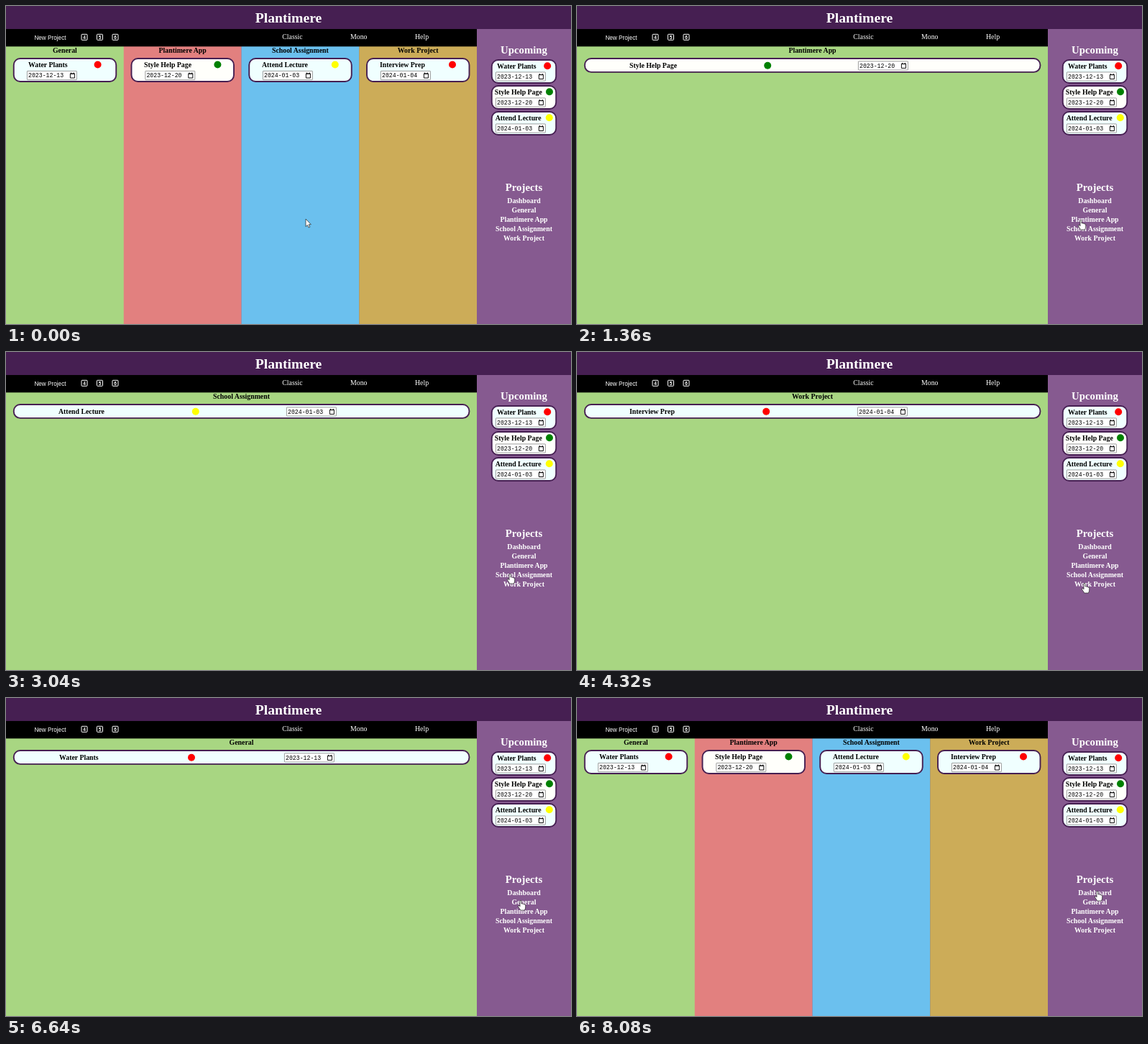
Recreate the animation shown at these times as an HTML page. Size 786 px wide and 442 px high, loop 8.32 s.

```html
<!DOCTYPE html>
<html lang="en">
<head>
<meta charset="utf-8">
<title>Task board</title>
<style>
  html, body { margin: 0; width: 100%; height: 100%; overflow: hidden; background: #461f52; }
  svg { display: block; width: 786px; height: 442px; }
  text { font: 9.84px "Liberation Serif", "Times New Roman", serif; white-space: pre; }
  .bold { font-weight: bold; }
  .title { font-size: 19.7px; font-weight: bold; }
  .head { font-size: 14.77px; font-weight: bold; }
  .button { font: 8.2px "Liberation Sans", Arial, sans-serif; }
  .date { font: 8.2px "Liberation Mono", monospace; }
  .digit { font: bold 6.5px "Liberation Sans", Arial, sans-serif; }
</style>
</head>
<body>
<svg id="stage" viewBox="0 0 786 442" xmlns="http://www.w3.org/2000/svg"></svg>
<script>
const LOOP = 8320;
const PURPLE = '#461f52', GREEN = '#a8d682', AZURE = '#f0ffff', IVORY = '#fffffb';
const stage = document.getElementById('stage');

function add(parent, tag, attrs = {}, content) {
  const node = document.createElementNS('http://www.w3.org/2000/svg', tag);
  for (const key in attrs) node.setAttribute(key, attrs[key]);
  if (content !== undefined) node.textContent = content;
  parent.appendChild(node);
  return node;
}
const group = parent => add(parent, 'g');
const box = (parent, x, y, width, height, fill, more = {}) =>
  add(parent, 'rect', { x, y, width, height, fill, ...more });
const label = (parent, x, y, content, cls = 'bold', fill = '#000', anchor = 'start') =>
  add(parent, 'text', { x, y, class: cls, fill, 'text-anchor': anchor }, content);
const centered = (parent, x, y, content, cls, fill) =>
  label(parent, x, y, content, cls, fill, 'middle');

// wide: name, dot and date positions in the single-project view
const projects = [
  { name: 'General', color: GREEN, task: 'Water Plants', date: '2023-12-13',
    dot: 'red', fill: AZURE, nameX: 31, dotX: 127.6, dateX: 29, wide: [74, 258, 387] },
  { name: 'Plantimere App', color: '#e2807f', task: 'Style Help Page', date: '2023-12-20',
    dot: 'green', fill: IVORY, nameX: 192, dotX: 294.4, dateX: 193.4, wide: [73, 265.2, 391] },
  { name: 'School Assignment', color: '#6bc0ee', task: 'Attend Lecture', date: '2024-01-03',
    dot: 'yellow', fill: AZURE, nameX: 356, dotX: 457.8, dateX: 357, wide: [73, 263.8, 390] },
  { name: 'Work Project', color: '#ccac58', task: 'Interview Prep', date: '2024-01-04',
    dot: 'red', fill: AZURE, nameX: 520, dotX: 621, dateX: 521, wide: [73, 263.2, 390] }
];

function dateField(parent, x, y, date) {
  box(parent, x + .4, y + .4, 69, 12.2, '#fff', { stroke: '#767676', 'stroke-width': .7, rx: .5 });
  label(parent, x + 2, y + 9.4, date, 'date');
  add(parent, 'path', {
    d: `M${x + 60.4} ${y + 4}h6v6h-6zM${x + 60.4} ${y + 4.2}h6M${x + 61.5} ${y + 2.5}v1.5m3.8 0v-1.5`,
    fill: 'none', stroke: '#111', 'stroke-width': 1
  });
}

function card(parent, x, y, w, h, p, nameX, nameY, dotX, dotY, dateX, dateY) {
  box(parent, x + .95, y + .95, w - 1.9, h - 1.9, p.fill,
    { rx: 9, stroke: PURPLE, 'stroke-width': 1.9 });
  label(parent, nameX, nameY, p.task);
  add(parent, 'circle', { cx: dotX, cy: dotY, r: 5, fill: p.dot });
  dateField(parent, dateX, dateY, p.date);
}

function buildDashboard() {
  const g = group(stage);
  projects.forEach((p, i) => {
    const x = i * 163.75;
    box(g, x, 56, 164, 386, p.color);
    centered(g, x + 81.9, 65.2, p.name, 'bold', '#000');
    card(g, x + 9.8, 72, 144.4, 34, p, p.nameX, 85, p.dotX, 81.5, p.dateX, 90);
  });
  return g;
}

function buildProject(p) {
  const g = group(stage);
  const [nameX, dotX, dateX] = p.wide;
  box(g, 0, 56, 655, 386, GREEN);
  centered(g, 327.5, 65.2, p.name, 'bold', '#000');
  card(g, 9.8, 72, 635.6, 20.8, p, nameX, 86, dotX, 82.8, dateX, 76.4);
  return g;
}

const links = ['Dashboard', ...projects.map(p => p.name)]
  .map((name, i) => ({ name, y: 274 + i * 13, half: name.length * 2.4 }));

function buildFrame() {
  box(stage, 0, 0, 786, 32, PURPLE);
  centered(stage, 393, 23, 'Plantimere', 'title', '#fff');
  box(stage, 0, 32, 655, 24.3, '#000');
  label(stage, 39.4, 47, 'New Project', 'button', '#fff');
  [4, 5, 6].forEach((n, i) => {
    const x = 109 + i * 21.5;
    box(stage, x - 4, 39.3, 8, 8, 'none', { rx: .8, stroke: '#fff', 'stroke-width': 1 });
    centered(stage, x, 45.6, n, 'digit', '#fff');
  });
  label(stage, 384.3, 46, 'Classic', '', '#fff');
  label(stage, 479, 46, 'Mono', '', '#fff');
  label(stage, 569, 46, 'Help', '', '#fff');

  box(stage, 655, 32, 131, 410, '#865a90');
  centered(stage, 720.5, 66, 'Upcoming', 'head', '#fff');
  const nameX = [683, 679.7, 680.7], dotX = [753.2, 756, 755.8];
  projects.slice(0, 3).forEach((p, i) => {
    const y = 74 + i * 36;
    card(stage, 674.8, y, 91.4, 34, p, nameX[i], y + 12.6, dotX[i], y + 9.2, 681, y + 17.5);
  });
  centered(stage, 720.5, 257, 'Projects', 'head', '#fff');
  links.forEach(l => centered(stage, 720.5, l.y, l.name, 'bold', '#fff'));
}

const views = [buildDashboard(), ...projects.map(buildProject)];
buildFrame();

const ink = { fill: '#fff', stroke: '#222', 'stroke-width': .7, 'stroke-linejoin': 'round' };
const arrow = add(stage, 'path', { ...ink, d: 'M0 0V10.6L2.4 8.4 4 12 5.7 11.3 4.2 7.7H7.3Z' });
const hand = group(stage);
add(hand, 'path', { ...ink, d: `M-1 1Q0-.6 1 1V5Q2.2 4.2 3 5.3 4.4 4.8 5 6
  6.7 5.6 6.7 7.4V10Q6.6 12 5.4 14H-.3Q-1.5 11.5-3.3 9.2-4.2 7.5-2.4 7.4L-1 8.8Z` });

// [time, view]
const clicks = [[0, 0], [1360, 2], [2800, 3], [4240, 4], [6240, 1], [8080, 0]];
// [time, x, y] of the pointer tip
const path = [
  [0, 417, 296], [160, 417, 296], [1040, 701, 297], [2300, 701, 297], [2640, 701, 308],
  [3500, 701, 308], [4000, 706, 321], [5180, 706, 321], [5360, 705, 315.8],
  [5840, 716, 281], [6900, 716, 281], [7360, 724, 268], [LOOP, 724, 268]
];

function hold(t) {
  const tick = Math.floor(t / 80) * 80;
  const step = Math.ceil((tick + 88) / 180.8) - 1;
  return Math.max(0, Math.floor((180.8 * step - 8) / 80) * 80);
}

function pointerAt(t) {
  const i = Math.max(1, path.findIndex(k => k[0] >= t));
  const [t0, x0, y0] = path[i - 1], [t1, x1, y1] = path[i];
  const u = (t - t0) / (t1 - t0), e = u * u * (3 - 2 * u);
  return [x0 + (x1 - x0) * e, y0 + (y1 - y0) * e];
}

function draw(now) {
  const t = hold(now % LOOP);
  const current = clicks.filter(c => c[0] <= t).pop()[1];
  views.forEach((v, i) => v.setAttribute('display', i === current ? 'inline' : 'none'));

  const [x, y] = pointerAt(t);
  const over = links.some(l => Math.abs(x - 720.5) < l.half && y > l.y - 8.8 && y < l.y + 2.2);
  arrow.setAttribute('display', over ? 'none' : 'inline');
  hand.setAttribute('display', over ? 'inline' : 'none');
  (over ? hand : arrow).setAttribute('transform', `translate(${x} ${y})`);
}

let start;
function tick(now) {
  start ??= now;
  draw(now - start);
  requestAnimationFrame(tick);
}
draw(0);
requestAnimationFrame(tick);
</script>
</body>
</html>
```
